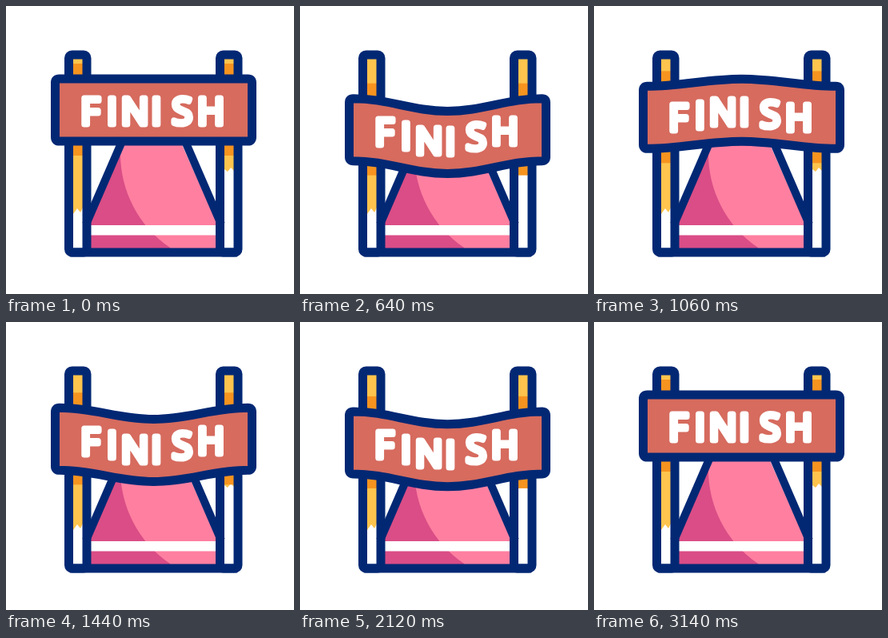
Recreate the animation shown at these times as an HTML page. Size 360 by 360 pixels, loop 3160 ms.

```html
<!DOCTYPE html>
<html lang="en">
<head>
<meta charset="utf-8">
<title>Finish line</title>
<style>
  html, body { margin: 0; width: 100%; height: 100%; overflow: hidden; background: #fff; }
  svg { display: block; width: 100vw; height: 100vh; }
  .ink { fill: none; stroke: #022874; stroke-width: 11; stroke-linejoin: round; }
  #word { font: 400 46px "Open Sans", "Noto Sans", sans-serif; text-anchor: middle;
    fill: #fff; stroke: #fff; stroke-width: 7; stroke-linejoin: round; }
  #rays { stroke: #ffca50; stroke-width: 9.5; stroke-linecap: round; }
</style>
</head>
<body>
<svg viewBox="0 0 360 360">
  <clipPath id="road"><path d="M150 169H218L264 272V305H105V272Z"/></clipPath>
  <clipPath id="poles"><path d="M84 66h12v237h-12zM273 66h12v237h-12z"/></clipPath>

  <g clip-path="url(#road)">
    <path fill="#ff7fa0" d="M100 165H270V305H100Z"/>
    <path fill="#da4d86" d="M143 165V185C143 230 165 275 205 302V305H100V165Z"/>
    <path fill="#fff" d="M100 274H270V286.5H100Z"/>
  </g>
  <g clip-path="url(#poles)">
    <path fill="#ffc44d" d="M84 66h12v186l-3 6-4-5-5 7zM273 66h12v140l-4-4-4 5-4-3z"/>
    <rect id="shade" x="80" width="210" height="115" fill="#f7941f"/>
  </g>
  <path class="ink" style="stroke-width:10" d="M149 160L100 273M220 160L269 273"/>
  <g class="ink">
    <rect x="78.5" y="61" width="22.5" height="247" rx="4"/>
    <rect x="267.5" y="61" width="22.5" height="247" rx="4"/>
    <path d="M80 308H289"/>
  </g>
  <g id="rays"></g>
  <path id="banner" class="ink" style="fill:#d66b5e"/>
  <g id="word"></g>
</svg>
<script>
const LOOP = 3160, START = 200, BOUNCE = 720, LAND = START + 3 * BOUNCE;
const LEFT = 61.5, RIGHT = 307.5, SPAN = RIGHT - LEFT;
const { sin, cos, PI } = Math;
const $ = id => document.getElementById(id);
const clamp = v => Math.min(1, Math.max(0, v));

function add(parent, tag, text = "") {
  const el = document.createElementNS("http://www.w3.org/2000/svg", tag);
  el.textContent = text;
  return $(parent).appendChild(el);
}

const letters = [["F", 105], ["I", 132.5], ["N", 161], ["I", 188], ["S", 220], ["H", 256]]
  .map(([char, x]) => ({ x, el: add("word", "text", char) }));

// Each ray runs from its inner end to its outer end
const rays = [[148, 55, 128.5, 29], [180, 48, 180, 16], [213, 55, 232.5, 29]]
  .map(ends => ({ ends, el: add("rays", "line") }));

// Vertical shift of the banner's ends, and extra sag at its middle
function pose(t) {
  if (t < START) return [0, 0];
  if (t < LAND) {
    const a = (t - START) / BOUNCE * 2 * PI;
    return [14 * (1 - cos(a)), (3 - 13 * sin(a + PI * 2 / 9)) * clamp((t - START) / 120)];
  }
  const u = t - LAND, fade = clamp(1 - u / 780);
  return [-4 * fade * sin(PI * u / 400), -10 * fade * cos(PI * (u - 130) / 400)];
}

function bannerPath(shift, sag) {
  const top = 91 + shift, low = top + 78, mid = LEFT + SPAN / 2;
  const l = LEFT + 5, r = RIGHT - 5, k = 44;
  return `M${LEFT} ${top + 5}Q${LEFT} ${top} ${l} ${top}
    C${l + k} ${top} ${mid - k} ${top + sag} ${mid} ${top + sag}
    S${r - k} ${top} ${r} ${top}Q${RIGHT} ${top} ${RIGHT} ${top + 5}
    V${low - 5}Q${RIGHT} ${low} ${r} ${low}
    C${r - k} ${low} ${mid + k} ${low + sag} ${mid} ${low + sag}
    S${l + k} ${low} ${l} ${low}Q${LEFT} ${low} ${LEFT} ${low - 5}Z`;
}

function drawRays(t) {
  const head = clamp((t - LAND + 20) / 220), tail = clamp((t - LAND - 190) / 200);
  $("rays").style.display = head > 0 && tail < 1 ? "" : "none";
  for (const { ends: [x1, y1, x2, y2], el } of rays) {
    const set = (n, p) => {
      el.setAttribute("x" + n, x1 + (x2 - x1) * p);
      el.setAttribute("y" + n, y1 + (y2 - y1) * p);
    };
    set(1, tail);
    set(2, head);
  }
}

function draw(now) {
  const t = now % LOOP, [shift, sag] = pose(t);
  $("banner").setAttribute("d", bannerPath(shift, sag));
  $("shade").setAttribute("y", 72 + shift);
  // Letters stay upright and follow a narrower curve than the cloth
  for (const { x, el } of letters) {
    const drop = 0.9 * sag * cos((x - 177) / SPAN * PI) ** 4;
    el.setAttribute("transform", `translate(${x} ${147.5 + shift + drop})`);
  }
  drawRays(t);
  requestAnimationFrame(() => draw(performance.now()));
}
draw(0);
</script>
</body>
</html>
```
